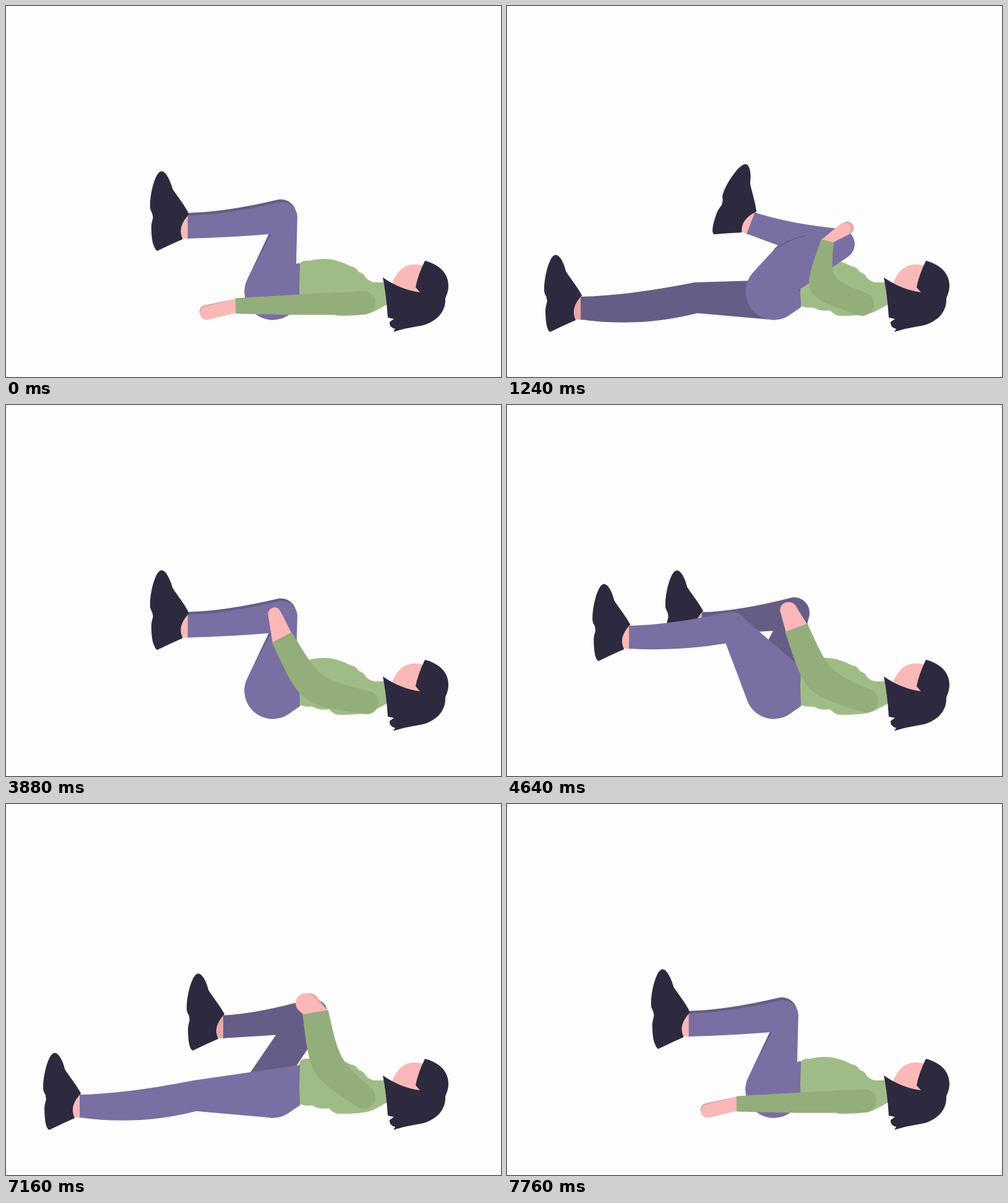
Write an HTML page with a canvas that moves like this. It is 800 px wide and 600 px high and loops after 7.96 s.

```html
<!DOCTYPE html>
<html lang="en">
<head>
<meta charset="utf-8">
<title>Knee to chest stretch</title>
<style>
html, body { margin: 0; width: 100%; height: 100%; overflow: hidden; background: #fdfdfd; }
canvas { display: block; }
</style>
</head>
<body>
<canvas id="stage" width="800" height="600"></canvas>
<script>
const ctx = document.getElementById('stage').getContext('2d');

const ink = '#2d2a40', violet = '#7a6fa2', plum = '#665d86', green = '#a0bc86',
  moss = '#93ad7b', skin = '#fbb8b8', skinShade = '#e6a9a8', paper = '#fdfdfd';

const LOOP = 7960, HALF = 3880, STEP = 120;
const LIFT = 520, HUG = 1240, RELEASE = 3280;

const rad = deg => deg * Math.PI / 180;
const polar = ([x, y], deg, len) => [x + Math.cos(rad(deg)) * len, y + Math.sin(rad(deg)) * len];
const heading = (p, q) => Math.atan2(q[1] - p[1], q[0] - p[0]) * 180 / Math.PI;
const distance = (p, q) => Math.hypot(q[0] - p[0], q[1] - p[1]);

// Blends numbers, points and whole poses alike.
function mix(a, b, t) {
  if (typeof a === 'number') return a + (b - a) * t;
  if (Array.isArray(a)) return a.map((v, i) => mix(v, b[i], t));
  return Object.fromEntries(Object.keys(a).map(k => [k, mix(a[k], b[k], t)]));
}

// Bone angles in degrees and lengths; crook is how far the knee pit slides down the shin.
const rest = { thigh: -82.9, thighLen: 121, shin: 174.2, shinLen: 153, crook: 20, waist: 416, turn: 0 };
const raised = { thigh: -62.3, thighLen: 138, shin: 171.9, shinLen: 145.5, crook: 63, waist: 433, turn: 0 };
const hugged = { thigh: -36, thighLen: 131, shin: 193.4, shinLen: 147, crook: 96, waist: 460, turn: 21 };
const straight = { thigh: -184.5, thighLen: 126, shin: 174.9, shinLen: 187, crook: 0, waist: 441, turn: 0 };
const lowering = { ...straight, waist: 422 };

const near = { rest, raised, hugged, straight, lowering };
const far = {
  ...near,
  rest: { ...rest, thigh: -84, thighLen: 125 },
  raised: { ...raised, waist: 423 },
  hugged: { ...hugged, waist: 442 }
};

// Joints, half widths at cuff and elbow, palm radius, and the other hand's offset.
const arms = {
  floor: { wrist: [371, 485], elbow: [482, 483], shoulder: [578, 480], tip: [324, 497],
    cuff: 12.5, bend: 17, palm: 10.5, back: [-1, -3] },
  thigh: { wrist: [446, 376], elbow: [492, 464], shoulder: [583, 481], tip: [434, 338],
    cuff: 18, bend: 26, palm: 10.5, back: [0, 0] },
  knee: { wrist: [500, 337], elbow: [515, 426], shoulder: [578, 474], tip: [484, 322],
    cuff: 21, bend: 27, palm: 16, back: [6, 0] },
  hug: { wrist: [518, 380], elbow: [499, 455], shoulder: [574, 482], tip: [545, 361],
    cuff: 10.5, bend: 27, palm: 10.5, back: [5, -2] }
};

const shoe = new Path2D(`M253,271.5 C261,271 268,288 270,298 C276,308 288,322 296,337
  Q276,358 286,377 Q265,386 245,396 C238,394 237,372 237,360 C238,350 241,347 239,343
  C240,338 234,336 235,326 C235,308 243,273 253,271.5Z`);
const ankleSkin = new Path2D('M296,338 L281,345 L281,375 L297,377Z');
const torso = new Path2D(`M471,430 L476,415 Q482,411 490,412 C506,408 522,408 535,412
  Q546,415 557,421 Q566,422 570,430 Q578,432 582,440 Q590,448 600,447 L614,447 L620,480
  Q600,492 590,496 Q577,501 540,501 Q531,502 522,492 Q512,494 502,491 Q495,486 487,488 L471,485Z`);
const face = new Path2D('M624,448 C632,428 645,417 662,418 L680,420 L671,464 L640,461Z');
const hair = new Path2D(`M677,412 C700,418 715,432 715,452 C715,465 710,470 710,474
  C711,498 690,515 665,518 Q645,521 626,527 L629,522 Q619,520 620,511 L627,506 L617,504
  Q615,470 609,439 Q638,459 669,463 L662,455 Q665,437 677,412Z`);

const SEAT = [431, 462], SEAT_R = 45.5, KNEE_R = 25, CUFF_R = 18.5, WAIST_X = 475;

function fill(path, color) {
  ctx.fillStyle = color;
  ctx.fill(path);
}

function line(d, color) {
  ctx.strokeStyle = color;
  ctx.lineWidth = 1.5;
  ctx.stroke(new Path2D(d));
}

function legPath(pose, knee, ankle) {
  const { shin, thigh, turn, waist, crook, shinLen } = pose;
  const front = shin + 90;
  const cuffTop = polar(ankle, turn - 90, CUFF_R), cuffEnd = polar(ankle, turn + 90, CUFF_R);
  const kneeTop = polar(knee, front, KNEE_R);
  const pit = polar(polar(knee, shin, crook), front, -KNEE_R);
  const sag = polar(mix(cuffTop, kneeTop, 0.4), front, -8);
  const bulge = Math.max(0, shinLen - crook - 125) * 0.3;
  const calf = polar(mix(pit, cuffEnd, 0.5), front, -bulge);
  // The back of the thigh is the tangent from the knee pit to the seat.
  const touch = rad(heading(SEAT, pit)) - Math.acos(SEAT_R / distance(SEAT, pit));

  const path = new Path2D();
  path.moveTo(...cuffTop);
  path.quadraticCurveTo(...sag, ...kneeTop);
  path.arc(...knee, KNEE_R, rad(front - 360), rad(thigh + 90));
  path.lineTo(WAIST_X - 6, waist + 1);
  path.lineTo(WAIST_X, waist);
  path.quadraticCurveTo(WAIST_X - 2, 455, WAIST_X, 487);
  path.arc(...SEAT, SEAT_R, 0.9, touch);
  path.lineTo(...pit);
  path.quadraticCurveTo(...calf, ...cuffEnd);
  path.closePath();
  return path;
}

function drawLeg(pose, cloth, flesh) {
  const knee = polar(SEAT, pose.thigh, pose.thighLen);
  const ankle = polar(knee, pose.shin, pose.shinLen);
  ctx.save();
  ctx.translate(...ankle);
  ctx.rotate(rad(pose.turn));
  ctx.translate(-294, -357.5);
  fill(ankleSkin, flesh);
  fill(shoe, ink);
  ctx.restore();
  fill(legPath(pose, knee, ankle), cloth);
}

function handPath(wrist, side, cuff, tip, palm) {
  const dir = heading(wrist, tip);
  const path = new Path2D();
  path.moveTo(...polar(wrist, side, cuff - 1));
  path.arc(...tip, palm, rad(dir + 90), rad(dir - 90), true);
  path.lineTo(...polar(wrist, side, 1 - cuff));
  return path;
}

function drawArm({ wrist, elbow, shoulder, tip, cuff, bend, palm, back }) {
  const side = heading(wrist, elbow) - 90;
  const across = heading(wrist, shoulder) - 90;
  const upper = heading(elbow, shoulder);
  const inner = polar(elbow, across, bend), outer = polar(elbow, across, -bend);
  const r = 19;

  const sleeve = new Path2D();
  sleeve.moveTo(...polar(wrist, side, cuff));
  sleeve.bezierCurveTo(...inner, ...inner, ...polar(shoulder, upper - 90, r));
  sleeve.arc(...shoulder, r, rad(upper - 90), rad(upper + 90));
  sleeve.bezierCurveTo(...outer, ...outer, ...polar(wrist, side, -cuff));
  sleeve.closePath();

  const backTip = [tip[0] + back[0], tip[1] + back[1]];
  fill(handPath(wrist, side, cuff, backTip, palm), skinShade);
  fill(handPath(wrist, side, cuff, tip, palm), skin);
  fill(sleeve, moss);
}

// From the floor the arm passes the thigh on its way to the knee.
function reach(fromFloor, t) {
  if (!fromFloor) return mix(arms.thigh, arms.knee, t);
  return t < 0.5 ? mix(arms.floor, arms.thigh, t * 2) : mix(arms.thigh, arms.knee, t * 2 - 1);
}

function draw(time) {
  const first = time < HALF;
  const u = first ? time : time - HALF;
  const hugging = u >= HUG && u < RELEASE;
  const lifting = u < HUG;
  const t = lifting
    ? Math.min(1, Math.floor(Math.max(0, u - LIFT) / STEP) / 5)
    : Math.max(0, 1 - Math.floor((u - RELEASE) / STEP) / 5);

  const pose = (side, lead) => hugging
    ? side[lead ? 'hugged' : 'straight']
    : mix(side.rest, side[lead ? 'raised' : 'lowering'], t);

  ctx.fillStyle = paper;
  ctx.fillRect(0, 0, 800, 600);
  fill(torso, green);
  drawLeg(pose(far, !first), plum, hugging && !first ? skin : skinShade);
  if (hugging && !first) line('M441,389 Q470,398 498,397', violet);
  drawLeg(pose(near, first), violet, skin);
  if (hugging && first) line('M432,393 Q456,377 484,371', plum);
  drawArm(hugging ? arms.hug : reach(first === lifting, t));
  fill(face, skin);
  fill(hair, ink);
}

const start = performance.now();
function tick() {
  draw((performance.now() - start) % LOOP);
  requestAnimationFrame(tick);
}
tick();
</script>
</body>
</html>
```
